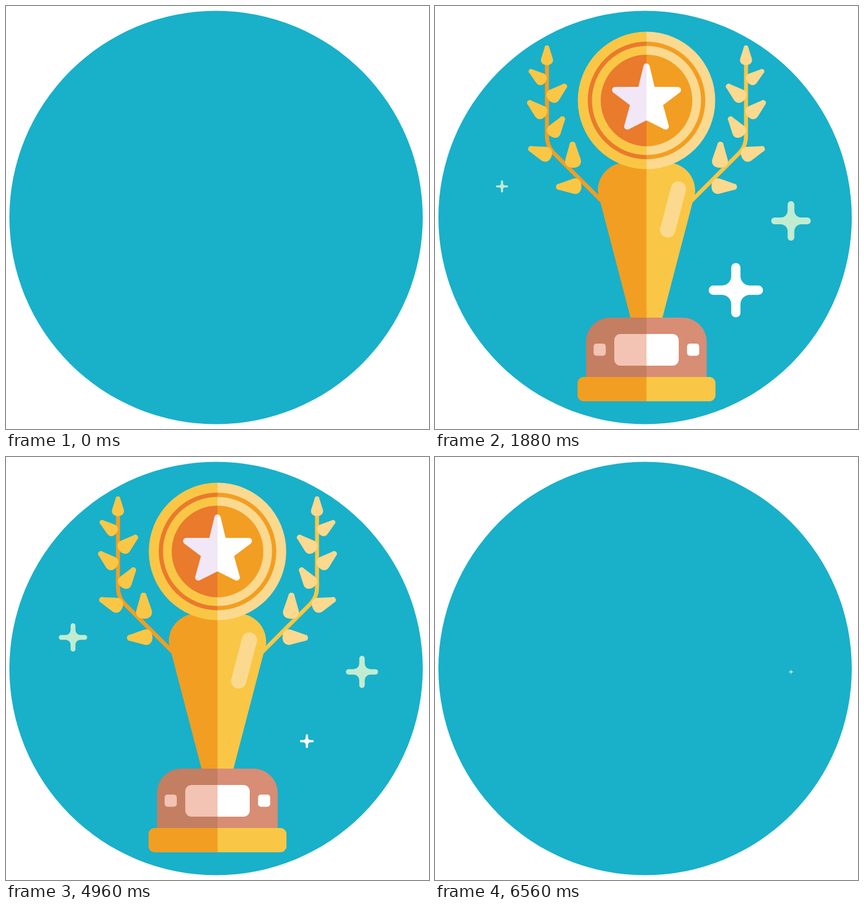
Recreate the animation shown at these times as an HTML page. Size 748x748 px, loop 6.6 s.

```html
<!DOCTYPE html>
<html lang="en">
<head>
<meta charset="utf-8">
<title>Trophy</title>
<style>
  html, body { margin: 0; width: 100%; height: 100%; overflow: hidden; background: #fff; }
  svg { display: block; width: 100vw; height: 100vh; }
</style>
</head>
<body>
<svg viewBox="0 0 748 748">
  <defs id="defs">
    <clipPath id="disc"><circle cx="371.5" cy="374" r="365.5"/></clipPath>
    <path id="leaf" d="M.12-.12C-.04-.12-.04.12.12.12L.66.29C.84.35 1 .24 1 0C1-.24.84-.35.66-.29Z"/>
    <path id="spark" d="M-8.5-41.5A8.5 8.5 0 0 1 8.5-41.5V-26A17.5 17.5 0 0 0 26-8.5H41.5
      A8.5 8.5 0 0 1 41.5 8.5H26A17.5 17.5 0 0 0 8.5 26V41.5A8.5 8.5 0 0 1-8.5 41.5V26
      A17.5 17.5 0 0 0-26 8.5H-41.5A8.5 8.5 0 0 1-41.5-8.5H-26A17.5 17.5 0 0 0-8.5-26Z"/>
  </defs>
  <circle cx="371.5" cy="374" r="365.5" fill="#19b0ca"/>
  <g clip-path="url(#disc)">
    <g id="trophy">
      <g id="branches"></g>
      <path fill="url(#gold)" d="M374 277H337C310 277 288 299 288 326C288 335 291 341 293 349L346 552H402L455 349C457 341 460 335 460 326C460 299 438 277 411 277Z"/>
      <path d="M430.5 323.5L411.5 396" stroke="#fbd98f" stroke-width="27" stroke-linecap="round"/>
      <circle cx="374" cy="167" r="121.5" fill="url(#pale)"/>
      <circle cx="374" cy="167" r="100.2" fill="none" stroke="url(#rust)" stroke-width="7.5"/>
      <circle cx="374" cy="167" r="81" fill="url(#rust)"/>
      <path fill="url(#snow)" stroke="url(#snow)" stroke-width="11" stroke-linejoin="round"
        d="M374 107L384 148.5H429.5L397 173L408 213L374 196L340 213L351 173L318.500 148.500H364Z"/>
      <path fill="url(#clay)" d="M267 657V594A43 43 0 0 1 310 551H437.500A43 43 0 0 1 480.500 594V657Z"/>
      <rect x="317" y="580" width="114" height="56" rx="11" fill="url(#label)"/>
      <rect x="280.500" y="597" width="21.500" height="21.500" rx="5" fill="url(#label)"/>
      <rect x="445.700" y="597" width="21.500" height="21.500" rx="5" fill="url(#label)"/>
      <rect x="252" y="656" width="244" height="43" rx="11" fill="url(#gold)"/>
    </g>
  </g>
  <g id="sparks"></g>
</svg>
<script>
const LOOP = 6600, STEP = 40, PERIOD = 4000 / 3;
const $ = id => document.getElementById(id);

// Two-tone fills that switch colour on the trophy's axis
const tones = {
  gold: ['#f29e22', '#f9c745'],
  pale: ['#f9c745', '#fbd98f'],
  rust: ['#ea7a2c', '#f29e22'],
  snow: ['#f2e7f6', '#fff'],
  clay: ['#c47e61', '#d88d75'],
  label: ['#f3c3b3', '#fff']
};
$('defs').innerHTML += Object.entries(tones).map(([id, [a, b]]) =>
  `<linearGradient id="${id}" gradientUnits="userSpaceOnUse" x1="0" y1="0" x2="748" y2="0">
    <stop offset=".5" stop-color="${a}"/><stop offset=".5" stop-color="${b}"/>
  </linearGradient>`).join('');

// Leaves run from tip to base
const leaves = [
  [198, 69.5, 198, 104.5], [166.500, 113, 195, 135], [232.500, 139, 201, 166],
  [164, 168, 195, 195], [228, 196, 204, 230], [165, 251, 206, 266],
  [243, 240, 244.500, 286], [214, 320, 259, 318]
];
const leaf = ([x, y, bx, by]) => {
  const turn = Math.atan2(by - y, bx - x) * 180 / Math.PI;
  return `<use href="#leaf" transform="translate(${x} ${y}) rotate(${turn}) scale(${Math.hypot(bx - x, by - y)})"/>`;
};
const branch = (stem, fill, flip) =>
  `<g fill="${fill}" transform="${flip ? 'translate(748 0) scale(-1 1)' : ''}">
    <path d="M198 95V230Q198 248 210 260L300 350" fill="none" stroke="${stem}" stroke-width="7"/>
    ${leaves.map(leaf).join('')}
  </g>`;
$('branches').innerHTML = branch('#f29e22', '#f9c745') + branch('#f9c745', '#fbd98f', true);

// start: first growth; end: moment of vanishing; fade: where the last shrink begins
const sparks = [
  { x: 118.5, y: 319, r: 51.3, start: 667, fade: 6000, end: 6500, color: '#c1ecd1' },
  { x: 629.5, y: 380, r: 40.3, start: 1365, fade: 6032, end: 6685, color: '#c1ecd1' },
  { x: 532, y: 502.5, r: 51.3, start: 1103, fade: 5770, end: 6437, color: '#fff' }
];
const LOW = 0.135;
$('sparks').innerHTML = sparks.map(s => `<use href="#spark" fill="${s.color}"/>`).join('');
const nodes = [...$('sparks').children];

const ease = x => {
  x = Math.min(1, Math.max(0, x));
  return x * x * (3 - 2 * x);
};

function pulse(s, t) {
  const half = PERIOD / 2, age = t - s.start;
  if (age <= 0 || t >= s.end) return 0;
  if (age < half) return ease(age / half);
  if (t > s.fade) return pulse(s, s.fade) * (1 - ease((t - s.fade) / (s.end - s.fade)));
  const wave = ease(1 - Math.abs(age % PERIOD / half - 1));
  return LOW + (1 - LOW) * wave;
}

function draw(t) {
  const size = t < 3000 ? ease(t / 1000) : 1 - ease((t - 5833) / 1000);
  $('trophy').setAttribute('transform', `translate(374 1097) scale(${size}) translate(-374 -1097)`);
  sparks.forEach((s, i) => {
    const k = pulse(s, t) * s.r / 50;
    nodes[i].setAttribute('transform', `translate(${s.x} ${s.y}) scale(${k})`);
  });
}

const begin = performance.now();
function tick() {
  const t = (performance.now() - begin) % LOOP;
  draw(Math.floor(t / STEP) * STEP);
  requestAnimationFrame(tick);
}
tick();
</script>
</body>
</html>
```
